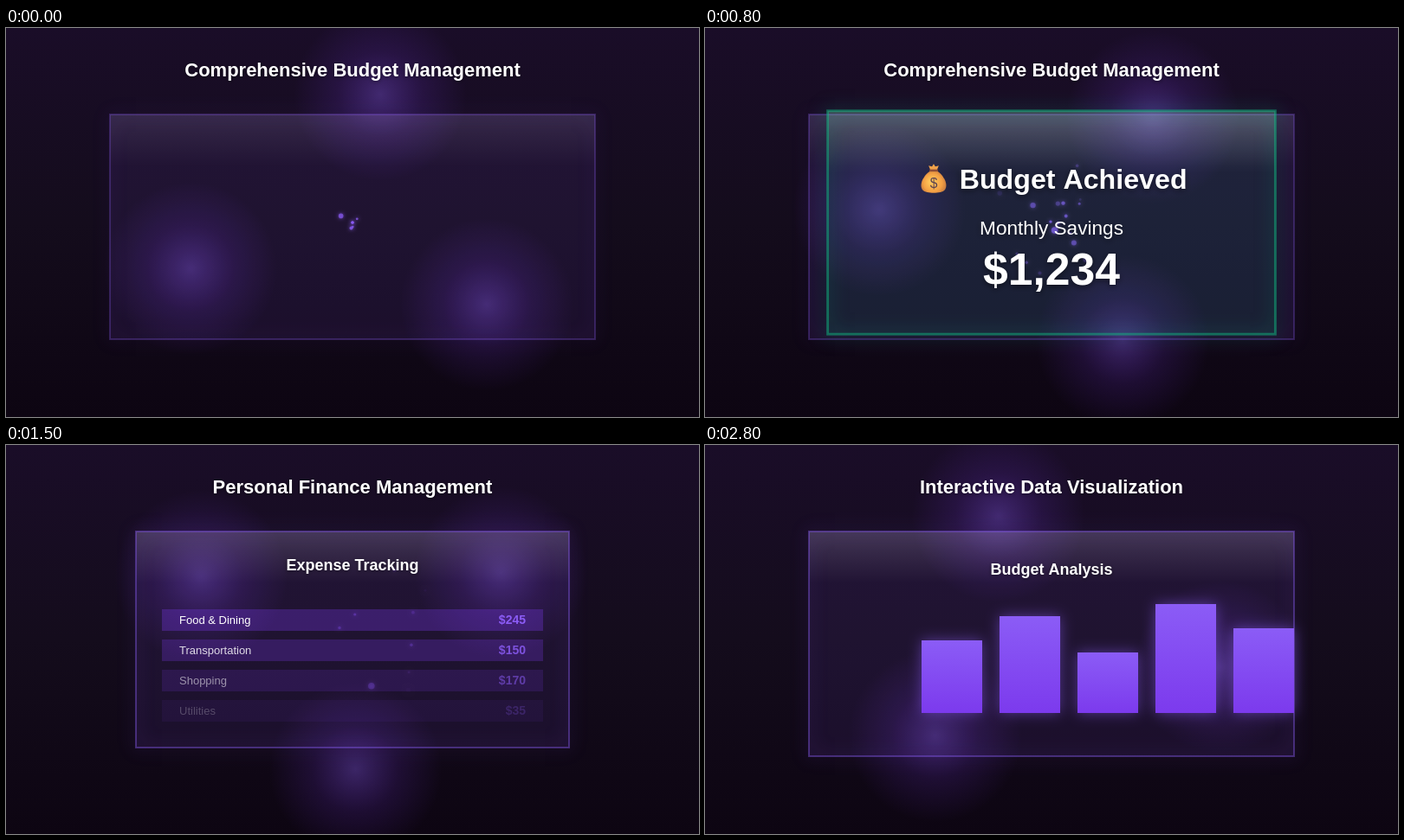
An HTML page with a canvas that plays this animation: 800 by 450 pixels, repeating every 2.9 s.

```html
<!DOCTYPE html>
<html lang="en">
<head>
<meta charset="utf-8">
<title>Budget Management</title>
<style>
  html, body { margin: 0; width: 100%; height: 100%; overflow: hidden; background: #120a1a; }
  canvas { display: block; width: 800px; height: 450px; }
</style>
</head>
<body>
<canvas id="stage" width="800" height="450"></canvas>
<script>
const ctx = document.getElementById('stage').getContext('2d');
const LOOP = 2900, STEP = 100, SCENE = 2800 / 3;
const FONT = '"Liberation Sans", Arial, sans-serif';
const violet = a => `rgba(139,92,246,${a})`;
const white = a => `rgba(255,255,255,${a})`;
const clamp = v => Math.max(0, Math.min(1, v));

// birth (s), velocity x and y (px/s), radius
const SPARKS = [
  [-.23, -58, -33, 2.8], [-.1, -15, 65, 2], [-.15, 35, -28, 1.4], [-.12, 2, 42, 1.4],
  [0, -50, 45, 1.6], [0, 37, -82, 1.8], [.06, 53, 58, 2.8], [.07, 10, -30, 2.6],
  [.2, -48, 77, 1.7], [.29, -42, -39, 3.2], [.33, 55, 50, 3], [.365, 74, -50, 1.5],
  [.45, 62, 36, 1.5], [.53, 50, -83, 2.2], [.58, 76, -34, 1.9], [.66, 26, 64, 3.8],
  [.71, 86, 8, 1.7], [.75, -20, -18, 1.7], [.81, 4, -42, 1.6]
];
const ROWS = [['Food & Dining', 245], ['Transportation', 180], ['Shopping', 320], ['Utilities', 150]];
const BARS = [84, 112, 70, 126, 98];

function linear(y0, y1, ...colors) {
  const g = ctx.createLinearGradient(0, y0, 0, y1);
  colors.forEach((c, i) => g.addColorStop(i / (colors.length - 1), c));
  return g;
}

function shadow(color, blur, dy = 0) {
  ctx.shadowColor = color;
  ctx.shadowBlur = blur;
  ctx.shadowOffsetY = dy;
}
const noShadow = () => shadow('transparent', 0);

function text(str, x, y, size, weight = 'bold', align = 'center', color = '#fff') {
  ctx.font = `${weight} ${size}px ${FONT}`;
  ctx.textAlign = align;
  ctx.fillStyle = color;
  ctx.fillText(str, x, y);
}

function heading(str, y, size) {
  shadow('rgba(0,0,0,.5)', 4, 1);
  text(str, 400, y, size);
  noShadow();
}

function glass(x, y, w, h, rgb, o) {
  ctx.fillStyle = `rgba(${rgb},${o.fill})`;
  ctx.fillRect(x, y, w, h);
  ctx.fillStyle = linear(y, y + o.depth, white(o.shine), white(0));
  ctx.fillRect(x, y, w, o.depth);
  shadow(`rgb(${rgb})`, 20);
  ctx.strokeStyle = `rgba(${rgb},${o.edge})`;
  ctx.lineWidth = o.line;
  ctx.strokeRect(x, y, w, h);
  noShadow();
}

function panel(x, w, h, bright) {
  glass(x, 100, w, h, '139,92,246', {
    fill: .09, depth: 60, shine: bright ? .15 : .09, edge: bright ? .4 : .27, line: 2
  });
}

function backdrop(s) {
  ctx.fillStyle = linear(0, 450, '#1a0d28', '#140c1c', '#0d0512');
  ctx.fillRect(0, 0, 800, 450);
  for (let i = 0; i < 3; i++) {
    const a = (39.2 + 33.2 * s + 120 * (i - 1)) * Math.PI / 180;
    const x = 400 + 200 * Math.cos(a), y = 225 + 150 * Math.sin(a);
    const g = ctx.createRadialGradient(x, y, 0, x, y, 100);
    g.addColorStop(0, violet(.36));
    g.addColorStop(.5, 'rgba(124,58,237,.14)');
    g.addColorStop(1, 'rgba(124,58,237,0)');
    ctx.fillStyle = g;
    ctx.fillRect(x - 100, y - 100, 200, 200);
  }
  for (const [birth, vx, vy, r] of SPARKS) {
    const age = s - birth;
    if (age < 0 || age > 1.2) continue;
    ctx.globalAlpha = .85 * (1 - age / 1.2);
    ctx.fillStyle = violet(1);
    shadow(violet(1), 4);
    ctx.beginPath();
    ctx.arc(400 + vx * age, 225 + vy * age, r, 0, 7);
    ctx.fill();
  }
  ctx.globalAlpha = 1;
  noShadow();
}

function moneyBag(x, y) {
  ctx.save();
  ctx.translate(x, y);
  const g = ctx.createRadialGradient(-3, 3, 2, 0, 5, 17);
  g.addColorStop(0, '#ffc65a');
  g.addColorStop(.6, '#f3a044');
  g.addColorStop(1, '#b9713f');
  ctx.fillStyle = g;
  ctx.beginPath();
  ctx.moveTo(-5, -9);
  ctx.bezierCurveTo(-12, -4, -18, 7, -13, 13);
  ctx.bezierCurveTo(-9, 17.5, 9, 17.5, 13, 13);
  ctx.bezierCurveTo(18, 7, 12, -4, 5, -9);
  ctx.fill();
  ctx.fillStyle = '#f0a24a';
  ctx.beginPath();
  ctx.moveTo(-4, -11);
  for (const [px, py] of [[-6, -16], [-2, -15], [0, -18], [2, -15], [6, -16], [4, -11]]) ctx.lineTo(px, py);
  ctx.fill();
  ctx.fillStyle = '#8f4e36';
  ctx.fillRect(-5, -11.5, 10, 2.5);
  text('$', 0, 10, 16, 'normal', 'center', '#5b4250');
  ctx.restore();
}

function savings(s) {
  heading('Comprehensive Budget Management', 56, 22);
  panel(120, 560, 260, false);
  const k = 1 - (1 - clamp(s / .95)) ** 2;
  if (!k) return;
  ctx.save();
  ctx.translate(400, 225);
  ctx.scale(k, k);
  glass(-265, -132.5, 530, 265, '16,185,129', { fill: .09, depth: 74, shine: .17, edge: .5, line: 3 });
  moneyBag(-139.5, -51.5);
  shadow('rgba(0,0,0,.5)', 6, 2);
  text('Budget Achieved', -109, -40.5, 33, 'bold', 'left');
  text('Monthly Savings', 0, 14.4, 23.2, 'normal');
  text('$1,234', 0, 73.6, 53);
  ctx.restore();
}

function expenses(s) {
  heading('Personal Finance Management', 56, 22);
  panel(150, 500, 250, true);
  heading('Expense Tracking', 145, 18);
  ROWS.forEach(([name, total], i) => {
    const p = clamp(2 * s - .3 * i), y = 190 + 35 * i;
    ctx.globalAlpha = p;
    ctx.fillStyle = 'rgba(124,58,237,.3)';
    ctx.fillRect(180, y, 440, 25);
    text(name, 200, y + 17, 13, 'normal', 'left');
    text('$' + Math.floor(total * p + 1e-6), 600, y + 17, 14, 'bold', 'right', violet(1));
  });
  ctx.globalAlpha = 1;
}

function analysis(s) {
  heading('Interactive Data Visualization', 56, 22);
  panel(120, 560, 260, true);
  heading('Budget Analysis', 150, 18);
  BARS.forEach((full, i) => {
    const h = full * clamp(3.3 * s - .2 * i);
    if (!h) return;
    ctx.fillStyle = linear(310 - h, 310, violet(1), '#7c3aed');
    shadow(violet(.5), 15);
    ctx.fillRect(250 + 90 * i, 310 - h, 70, h);
  });
  noShadow();
}

const scenes = [savings, expenses, analysis];

function draw(ms) {
  const t = Math.floor(ms / STEP) * STEP;
  const n = Math.min(2, Math.floor(t / SCENE));
  backdrop(t / 1000);
  scenes[n]((t - n * SCENE) / 1000);
}

const start = performance.now();
function tick() {
  draw((performance.now() - start) % LOOP);
  requestAnimationFrame(tick);
}
tick();
</script>
</body>
</html>
```
